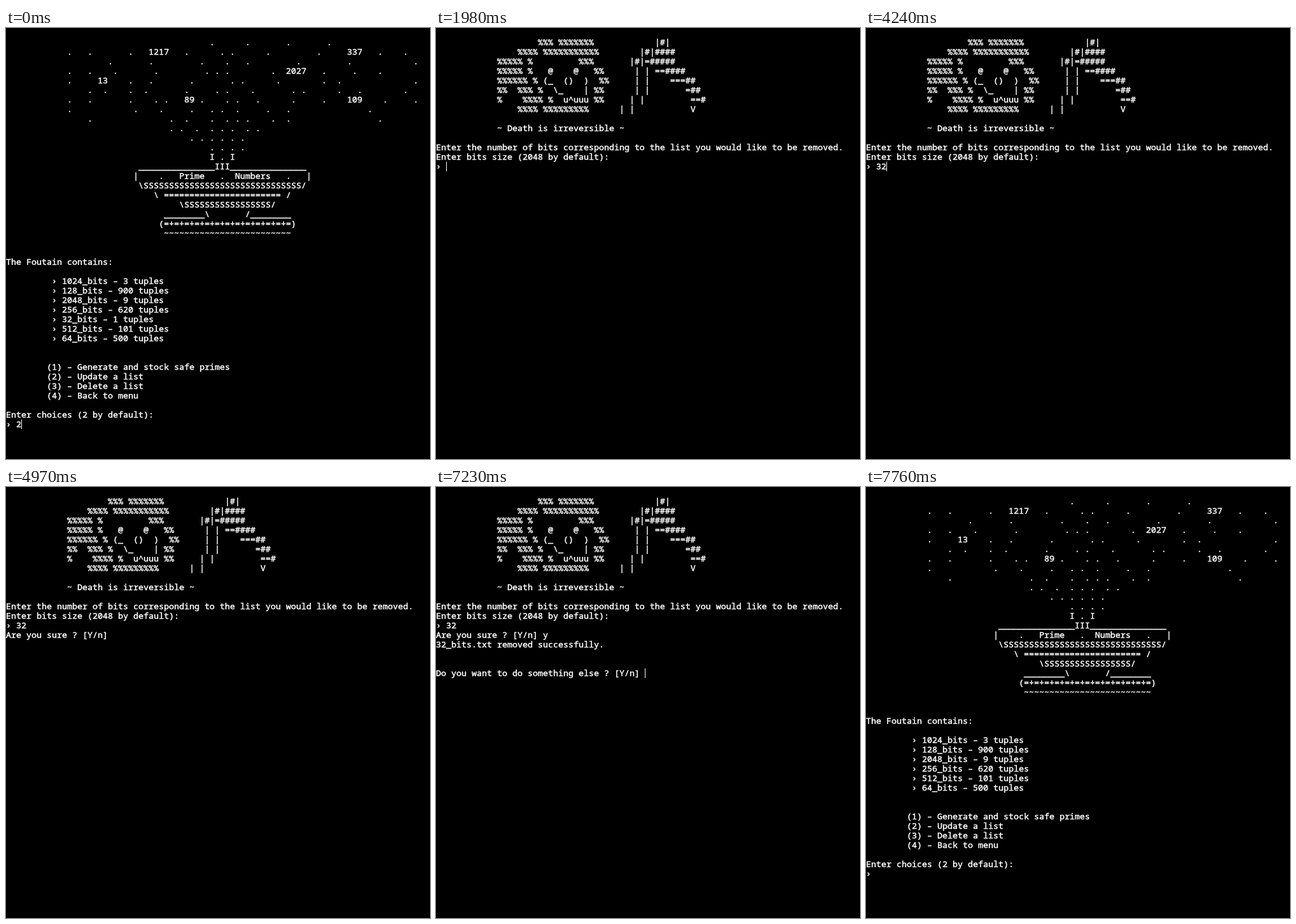
An HTML page for the animation above (8 s loop, 666 by 677 pixels).

```html
<!DOCTYPE html>
<html lang="en">
<head>
<meta charset="utf-8">
<title>Prime fountain terminal</title>
<style>
  html, body { margin: 0; width: 100%; height: 100%; overflow: hidden; background: #000; }
  #term {
    position: absolute; inset: 0; margin: 0; color: #fff;
    font: 13.3333px/15px "Noto Sans Mono", "DejaVu Sans Mono", monospace;
    font-variant-ligatures: none; white-space: pre;
    -webkit-text-stroke: 0.45px #fff;
  }
  #cursor { position: absolute; width: 1px; height: 15px; background: #fff; }
</style>
</head>
<body>
<pre id="term"></pre>
<div id="cursor"></div>
<script>
const LOOP = 8000, COL = 8, ROW = 15;

const fountain = String.raw`
                            .      .       .       .
.   .       .   1217   .      . .      .         .     337   .    .
        .       .         .    .   .         .         .            .
.   .    .       .         . . .        .  2027   .     .    .
.     13    .   .       .       . .      .        .  .              .
    .  .    .  .       .     . .    .       . .      .   .        .
.   .       .    . .   89 .    . .   .      .     .    109    .     .
.            .    .     .   . .  .     .   .               .
    .               .  .    .  . . .    .  .                 .
                    . .  .  . . .  . .
                        . . . . . .
                            . . . .
                            I . I
              _______________III_______________
             |    .   Prime   .  Numbers   .   |
              \SSSSSSSSSSSSSSSSSSSSSSSSSSSSSSS/
                 \ ======================= /
                      \SSSSSSSSSSSSSSSSS/
                   ________\       /________
                  (=+=+=+=+=+=+=+=+=+=+=+=+=)
                   ~~~~~~~~~~~~~~~~~~~~~~~~~`;

const reaper = String.raw`
        %%% %%%%%%%            |#|
    %%%% %%%%%%%%%%%        |#|####
%%%%% %         %%%       |#|=#####
%%%%% %   @    @   %%      | | ==####
%%%%%% % (_  ()  )  %%     | |    ===##
%%  %%% %  \_    | %%      | |       =##
%    %%%% %  u^uuu %%     | |         ==#
    %%%% %%%%%%%%%      | |           V

~ Death is irreversible ~`;

const indent = (text, n) => text.replace(/^(?=.)/gm, " ".repeat(n));

const lists = [
  "1024_bits – 3", "128_bits – 900", "2048_bits – 9", "256_bits – 620",
  "32_bits – 1", "512_bits – 101", "64_bits – 500",
];
const actions = `(1) – Generate and stock safe primes
(2) – Update a list
(3) – Delete a list
(4) – Back to menu`;

const menu = names => `${indent(fountain, 12)}


The Foutain contains:

${indent(names.map(name => `› ${name} tuples`).join("\n"), 9)}


${indent(actions, 8)}

Enter choices (2 by default):
› `;

const before = menu(lists);
const after = menu(lists.filter(name => !name.startsWith("32_")));
const remove = `${indent(reaper, 12)}

Enter the number of bits corresponding to the list you would like to be removed.
Enter bits size (2048 by default):
› `;
const confirm = remove + "32\nAre you sure ? [Y/n] ";
const done = confirm + "y\n32_bits.txt removed successfully.\n\n\nDo you want to do something else ? [Y/n] ";

// [start ms, text, cursor visible]
const steps = [
  [0, before + "2", 1], [130, before + "2", 0], [530, before, 1],
  [990, before + "3", 1], [1320, before + "3", 0], [1720, before + "3", 1],
  [1980, remove, 1], [2380, remove, 0], [2780, remove, 1], [3180, remove, 0],
  [3380, remove + "3", 1], [3510, remove + "32", 1],
  [3840, remove + "32", 0], [4240, remove + "32", 1],
  [4640, confirm, 1], [4970, confirm, 0], [5370, confirm, 1],
  [5630, confirm + "y", 1], [6030, confirm + "y", 0],
  [6430, done, 1], [6830, done, 0], [7230, done, 1],
  [7360, after, 1], [7760, after, 0],
];

const term = document.getElementById("term");
const cursor = document.getElementById("cursor");
let shown;

function draw() {
  const t = performance.now() % LOOP;
  const step = steps.findLast(([start]) => start <= t);
  if (step !== shown) {
    shown = step;
    const [, text, visible] = step;
    const lines = text.split("\n");
    term.textContent = text;
    cursor.style.left = lines.at(-1).length * COL + "px";
    cursor.style.top = (lines.length - 1) * ROW + "px";
    cursor.style.visibility = visible ? "visible" : "hidden";
  }
  requestAnimationFrame(draw);
}
draw();
</script>
</body>
</html>
```
